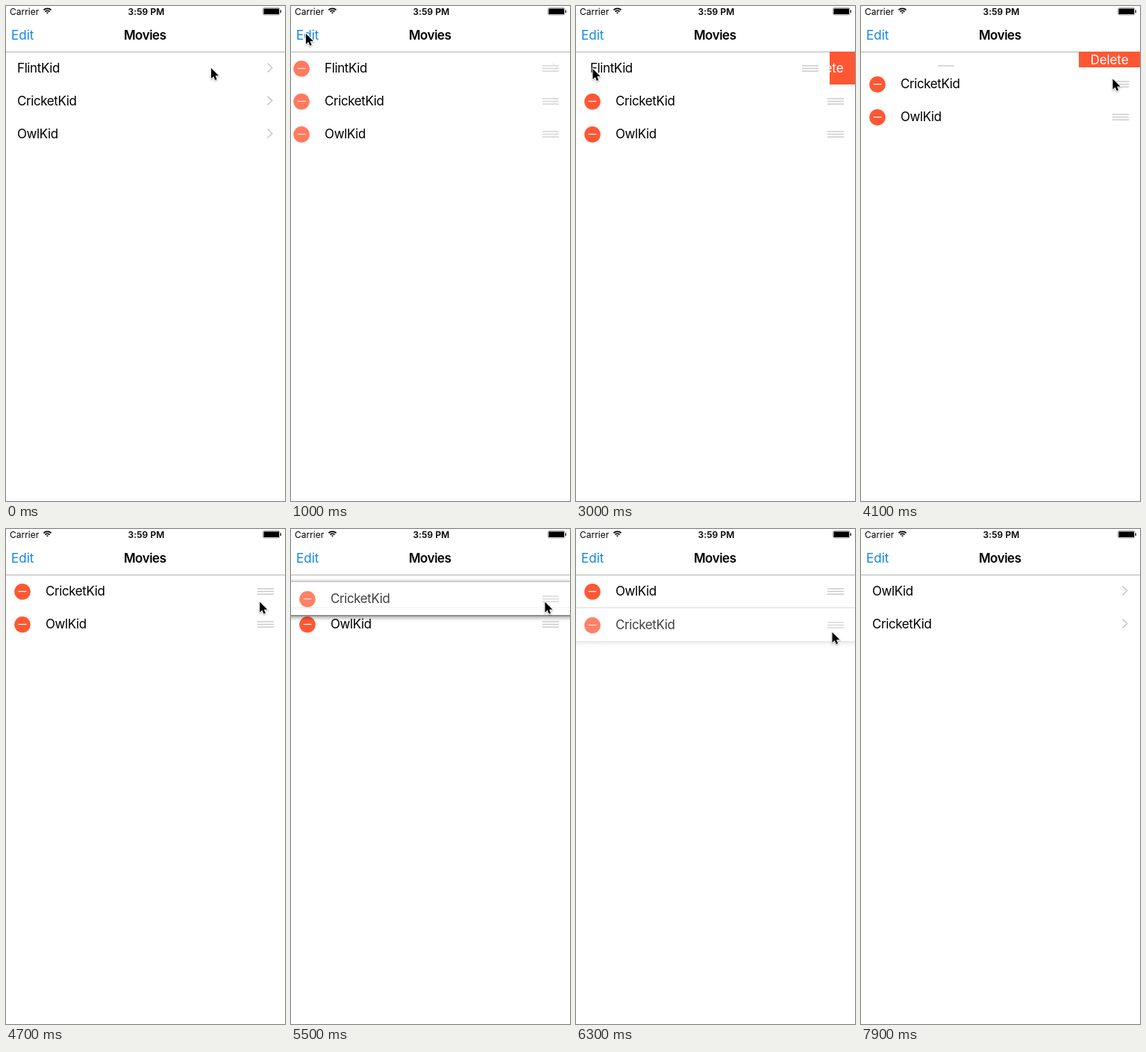
An HTML page with a canvas for the animation above (8800 ms loop, 374 by 662 pixels).

```html
<!DOCTYPE html>
<html lang="en">
<head>
<meta charset="utf-8">
<title>Editable list</title>
<style>
  html, body { margin: 0; width: 100%; height: 100%; overflow: hidden; background: #fff; }
  canvas { display: block; }
</style>
</head>
<body>
<canvas id="stage" width="374" height="662"></canvas>
<script>
const ctx = document.getElementById('stage').getContext('2d');
const W = 374, H = 662, LOOP = 8800, STEP = 100;
const ROW = 44, TOP = 61, DELETE_W = 82;
const RED = '#ff5734', BLUE = '#1187ea', GREY = '#c7c7cc', HAIRLINE = '#b2b2b2';

// Pointer stops: time, x, y
const pointerPath = [
  [0, 275, 83], [100, 274, 82], [200, 274, 82], [700, 20, 37], [1200, 20, 37],
  [1700, 331, 88], [1800, 331, 90], [1900, 296, 89], [2000, 134, 109], [2700, 22.5, 84],
  [3000, 22.5, 84], [3700, 337.5, 97.5], [4300, 337.5, 97.5], [4800, 340.5, 97.5],
  [5500, 340.5, 97.5], [6200, 343.5, 138], [6300, 343.5, 138], [7000, 20, 37],
  [7500, 20, 37], [7900, 60, -20]
];

const clamp = v => Math.min(1, Math.max(0, v));
const mix = (a, b, k) => a + (b - a) * k;
const progress = (t, start, end) => clamp((t - start) / (end - start));
const smooth = k => k * k * (3 - 2 * k);
const easeOut = k => 1 - (1 - k) ** 2;

function pointerAt(t) {
  const i = Math.max(1, pointerPath.findIndex(stop => stop[0] >= t));
  const [t0, x0, y0] = pointerPath[i - 1], [t1, x1, y1] = pointerPath[i];
  const k = smooth(progress(t, t0, t1));
  return [mix(x0, x1, k), mix(y0, y1, k)];
}

function rect(x, y, w, h, color) {
  ctx.fillStyle = color;
  ctx.fillRect(x, y, w, h);
}

function text(str, x, y, { size = 17, weight = 400, color = '#000', align = 'left', spacing = -0.4 } = {}) {
  ctx.font = `${weight} ${size}px Inter, sans-serif`;
  ctx.letterSpacing = spacing + 'px';
  ctx.textAlign = align;
  ctx.fillStyle = color;
  ctx.fillText(str, x, y);
}

function line(points, color, width) {
  ctx.beginPath();
  points.forEach(([x, y]) => ctx.lineTo(x, y));
  ctx.strokeStyle = color;
  ctx.lineWidth = width;
  ctx.stroke();
}

function faded(alpha, draw) {
  ctx.save();
  ctx.globalAlpha *= alpha;
  draw();
  ctx.restore();
}

function row(name, top, edit) {
  const mid = top + 22.5;
  if (edit > 0) faded(edit, () => {
    const x = mix(-16, 22, edit);
    ctx.beginPath();
    ctx.arc(x, mid + 0.3, 10.8, 0, 7);
    ctx.fillStyle = RED;
    ctx.fill();
    line([[x - 5.5, mid], [x + 5.5, mid]], '#fff', 1.2);
    for (const dy of [-3.6, 0, 3.6]) line([[337, mid + dy], [359, mid + dy]], GREY, 1.4);
  });
  text(name, mix(15, 53, edit), top + 28);
  faded(1 - edit, () => line([[350.5, mid - 7], [356.7, mid - 1], [350.5, mid + 5]], GREY, 1.6));
}

function deletableRow(name, edit, shift, collapse) {
  const height = ROW * (1 - collapse);
  ctx.save();
  ctx.beginPath();
  ctx.rect(0, TOP, W, height);
  ctx.clip();
  if (shift > 0) {
    rect(W - DELETE_W, TOP, DELETE_W, ROW, RED);
    text('Delete', 333, TOP + height / 2 + 6, { color: '#fff', align: 'center', spacing: -0.1 });
  }
  ctx.translate(-shift, 0);
  rect(0, TOP, W, ROW, '#fff');
  rect(0, TOP, W, 1, HAIRLINE);
  row(name, TOP, edit);
  ctx.restore();
}

function shadow(edge, reach, strength) {
  const fade = ctx.createLinearGradient(0, edge, 0, edge + reach);
  fade.addColorStop(0, `rgba(0,0,0,${strength})`);
  fade.addColorStop(0.4, `rgba(0,0,0,${strength * 0.35})`);
  fade.addColorStop(1, 'rgba(0,0,0,0)');
  rect(0, Math.min(edge, edge + reach), W, Math.abs(reach), fade);
}

function liftedRow(name, top, lift) {
  rect(0, TOP + ROW, W, 1, `rgba(0,0,0,${0.03 + 0.25 * lift})`);
  shadow(top, -5, 0.3 * lift);
  shadow(top + ROW, 8, 0.55 * lift);
  faded(0.75, () => {
    rect(0, top, W, ROW, '#fff');
    row(name, top, 1);
  });
}

function battery() {
  ctx.beginPath();
  ctx.roundRect(344.5, 2.5, 22.5, 9.5, 2);
  ctx.strokeStyle = '#777';
  ctx.lineWidth = 0.7;
  ctx.stroke();
  rect(345.5, 3.5, 20.5, 7.5, '#000');
  rect(367.6, 5.5, 1.2, 3.5, '#000');
}

function header(pressed) {
  rect(0, 0, W, TOP, '#fff');
  text('Carrier', 5, 11.5, { size: 12, spacing: 0 });
  text('3:59 PM', 188, 11.5, { size: 12, weight: 600, align: 'center', spacing: 0.1 });
  for (const r of [1.2, 4.2, 7.2]) {
    ctx.beginPath();
    ctx.arc(55.5, 10.5, r, -Math.PI * 0.75, -Math.PI * 0.25);
    ctx.strokeStyle = '#000';
    ctx.lineWidth = 1.8;
    ctx.stroke();
  }
  battery();
  faded(pressed ? 0.35 : 1, () => text('Edit', 7, 45, { color: BLUE, spacing: 0 }));
  text('Movies', 186.2, 45, { weight: 600, align: 'center', spacing: -0.5 });
}

function pointer(x, y) {
  ctx.save();
  ctx.translate(x, y);
  ctx.beginPath();
  for (const p of [[0, 0], [0, 14], [3.2, 11], [5.4, 16], [7.7, 15], [5.6, 10.2], [10, 10]]) ctx.lineTo(...p);
  ctx.closePath();
  ctx.shadowColor = 'rgba(0,0,0,.35)';
  ctx.shadowBlur = 2;
  ctx.shadowOffsetY = 1;
  ctx.strokeStyle = '#fff';
  ctx.lineWidth = 1.8;
  ctx.stroke();
  ctx.shadowColor = 'transparent';
  ctx.fillStyle = '#000';
  ctx.fill();
  ctx.restore();
}

function draw(t) {
  const [px, py] = pointerAt(t);
  const edit = smooth(progress(t, 760, 1100)) - smooth(progress(t, 7160, 7500));
  const collapse = easeOut(progress(t, 4000, 4325));
  const shift = DELETE_W * smooth(progress(t, 2860, 3176)) + (W - DELETE_W) * collapse;
  const swap = smooth(progress(t, 5750, 6000));
  const up = ROW * collapse;

  rect(0, 0, W, H, '#fff');
  rect(0, TOP, W, 1, HAIRLINE);
  row('OwlKid', TOP + 2 * ROW - up - ROW * swap, edit);

  if (t >= 5300 && t < 6400) {
    const offset = t < 5500 ? 0 : t < 6300 ? py - 87.5 : 45;
    const lift = t < 5500 ? 0.3 : t < 6300 ? 1 : 0.2;
    liftedRow('CricketKid', TOP + offset, lift);
  } else {
    row('CricketKid', TOP + ROW - up + (t >= 6400 ? ROW : 0), edit);
  }
  if (collapse < 1) deletableRow('FlintKid', edit, shift, collapse);

  header((t >= 800 && t < 1000) || (t >= 7200 && t < 7400));
  if (t < 7900) pointer(px, py);
}

const start = performance.now();
function tick() {
  const t = (performance.now() - start) % LOOP;
  draw(Math.floor(t / STEP) * STEP);
  requestAnimationFrame(tick);
}
tick();
</script>
</body>
</html>
```
